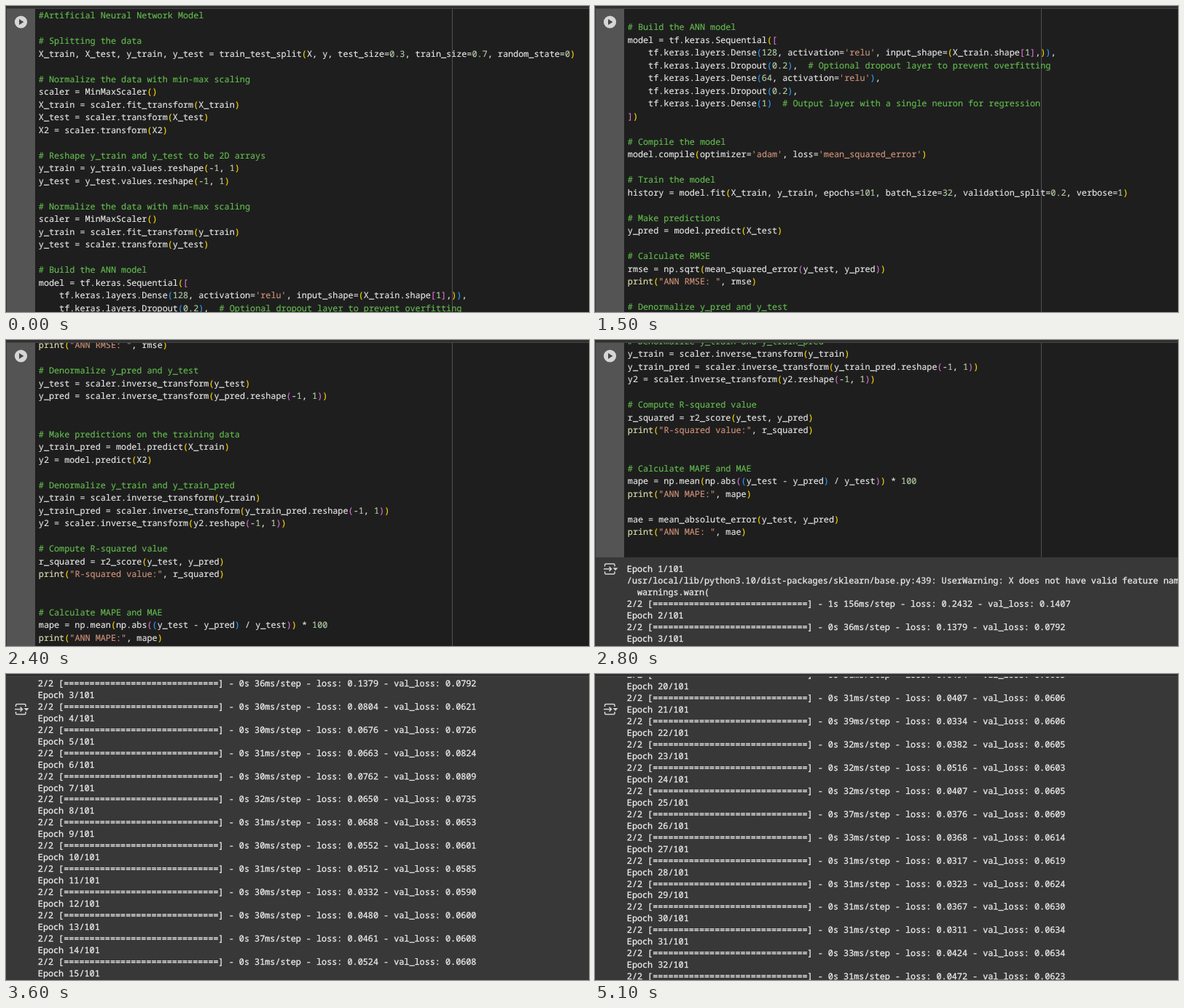
An HTML page that plays this animation: 800x421 px, repeating every 5.2 s.

```html
<!DOCTYPE html>
<html lang="en">
<head>
<meta charset="utf-8">
<title>Notebook scroll</title>
<style>
  html, body { margin: 0; width: 100%; height: 100%; overflow: hidden; background: #383838; }
  #stage { position: relative; width: 800px; height: 421px; overflow: hidden; background: #383838; }
  #doc { position: absolute; left: 0; top: 0; width: 800px; }
  pre {
    position: absolute; margin: 0; white-space: pre;
    font: 11.8px "Noto Sans Mono", "DejaVu Sans Mono", monospace;
    text-rendering: geometricPrecision; font-variant-ligatures: none;
  }
  #cell { position: absolute; left: 1px; top: 3px; width: 799px; height: 1200px; background: #1e1e1e; }
  #gutter { position: absolute; left: 0; top: 0; width: 39px; height: 100%; background: #545454; }
  #ruler { position: absolute; left: 611px; top: 0; width: 1px; height: 100%; background: #515151; }
  #code { left: 44.8px; top: 5.4px; line-height: 17.5px; color: #e6e6e6; -webkit-text-stroke: 0.15px; }
  #out { left: 43.8px; top: 1212.2px; line-height: 15.96px; color: #ececec; -webkit-text-stroke: 0.3px; }
  #bar { position: absolute; left: 0; top: 0; width: 800px; height: 3px; background: #303030; border-bottom: 1px solid #444; }
  svg { position: absolute; left: 0; top: 0; overflow: visible; }
  .comment { color: #62bb4d; }
  .str { color: #ce9178; }
  .num { color: #b5cea8; }
  .fn { color: #dcdcaa; }
  .b0 { color: #ffd700; }
  .b1 { color: #da70d6; }
  .b2 { color: #2a9fff; }
</style>
</head>
<body>
<div id="stage">
  <div id="doc">
    <div id="cell"><div id="gutter"></div><div id="ruler"></div></div>
    <pre id="code">#Artificial Neural Network Model

# Splitting the data
X_train, X_test, y_train, y_test = train_test_split(X, y, test_size=0.3, train_size=0.7, random_state=0)

# Normalize the data with min-max scaling
scaler = MinMaxScaler()
X_train = scaler.fit_transform(X_train)
X_test = scaler.transform(X_test)
X2 = scaler.transform(X2)

# Reshape y_train and y_test to be 2D arrays
y_train = y_train.values.reshape(-1, 1)
y_test = y_test.values.reshape(-1, 1)

# Normalize the data with min-max scaling
scaler = MinMaxScaler()
y_train = scaler.fit_transform(y_train)
y_test = scaler.transform(y_test)

# Build the ANN model
model = tf.keras.Sequential([
    tf.keras.layers.Dense(128, activation='relu', input_shape=(X_train.shape[1],)),
    tf.keras.layers.Dropout(0.2),  # Optional dropout layer to prevent overfitting
    tf.keras.layers.Dense(64, activation='relu'),
    tf.keras.layers.Dropout(0.2),
    tf.keras.layers.Dense(1)  # Output layer with a single neuron for regression
])

# Compile the model
model.compile(optimizer='adam', loss='mean_squared_error')

# Train the model
history = model.fit(X_train, y_train, epochs=101, batch_size=32, validation_split=0.2, verbose=1)

# Make predictions
y_pred = model.predict(X_test)

# Calculate RMSE
rmse = np.sqrt(mean_squared_error(y_test, y_pred))
print("ANN RMSE: ", rmse)

# Denormalize y_pred and y_test
y_test = scaler.inverse_transform(y_test)
y_pred = scaler.inverse_transform(y_pred.reshape(-1, 1))


# Make predictions on the training data
y_train_pred = model.predict(X_train)
y2 = model.predict(X2)

# Denormalize y_train and y_train_pred
y_train = scaler.inverse_transform(y_train)
y_train_pred = scaler.inverse_transform(y_train_pred.reshape(-1, 1))
y2 = scaler.inverse_transform(y2.reshape(-1, 1))

# Compute R-squared value
r_squared = r2_score(y_test, y_pred)
print("R-squared value:", r_squared)


# Calculate MAPE and MAE
mape = np.mean(np.abs((y_test - y_pred) / y_test)) * 100
print("ANN MAPE:", mape)

mae = mean_absolute_error(y_test, y_pred)
print("ANN MAE: ", mae)</pre>
    <pre id="out"></pre>
  </div>
  <svg id="play" width="1" height="1">
    <circle cx="20.5" cy="0" r="8.6" fill="#d6d6d6"/>
    <path d="M18 -4 L24.4 0 L18 4 Z" fill="#484848"/>
  </svg>
  <svg id="toggle" width="1" height="1" fill="none" stroke="#d6d6d6" stroke-width="1.5">
    <path d="M13.5 -3.5 V-5.5 Q13.5 -7 15 -7 H25.5 Q27 -7 27 -5.5 V-3.5 M13.5 3.5 V5.5 Q13.5 7 15 7 H25.5 Q27 7 27 5.5 V3.5"/>
    <path d="M12 0 H22.5 M19.5 -3 L22.5 0 L19.5 3"/>
    <path d="M24.5 -1.5 H31.5 L28 2.2 Z" fill="#d6d6d6" stroke="none"/>
  </svg>
  <div id="bar"></div>
</div>
<script>
  const $ = id => document.getElementById(id);

  // Syntax colours; brackets cycle through three colours by depth.
  function highlight(src) {
    let depth = 0;
    const span = (cls, s) => `<span class="${cls}">${s}</span>`;
    return src.replace(/#.*|'[^'\n]*'|"[^"\n]*"|[A-Za-z_]\w*|\d+(?:\.\d+)?|[()[\]]/g, s => {
      const c = s[0];
      if (c === '#') return span('comment', s);
      if (c === "'" || c === '"') return span('str', s);
      if (c === '(' || c === '[') return span('b' + depth++ % 3, s);
      if (c === ')' || c === ']') return span('b' + --depth % 3, s);
      if (/\d/.test(c)) return span('num', s);
      return s === 'print' ? span('fn', s) : s;
    });
  }

  // Training log: step time in ms, then losses in ten-thousandths.
  const ms = [156, 36, 30, 30, 31, 30, 32, 31, 30, 31, 30, 30, 37, 31, 31, 32,
    33, 31, 31, 31, 39, 32, 32, 32, 37, 33, 31, 31, 31, 31, 33, 31];
  const loss = [2432, 1379, 804, 676, 663, 762, 650, 688, 552, 512, 332, 480, 461, 524, 398, 506,
    544, 400, 494, 407, 334, 382, 516, 407, 376, 368, 317, 323, 367, 311, 424, 472];
  const val = [1407, 792, 621, 726, 824, 809, 735, 653, 601, 585, 590, 600, 608, 608, 602, 593,
    591, 596, 603, 606, 606, 605, 603, 605, 609, 614, 619, 624, 630, 634, 634, 623];
  const dec = n => (n / 1e4).toFixed(4);

  function trainingLog() {
    const lines = [];
    ms.forEach((m, i) => {
      lines.push(`Epoch ${i + 1}/101`);
      if (!i) lines.push(
        '/usr/local/lib/python3.10/dist-packages/sklearn/base.py:439: UserWarning: X does not have valid feature names, but MinMaxScaler was fitted with feature names',
        '  warnings.warn(');
      lines.push(`2/2 [${'='.repeat(30)}] - ${i ? 0 : 1}s ${m}ms/step - loss: ${dec(loss[i])} - val_loss: ${dec(val[i])}`);
    });
    return lines.join('\n');
  }

  $('code').innerHTML = highlight($('code').textContent);
  $('out').textContent = trainingLog();

  // Scroll path: monotone cubic through a few time and offset pairs.
  const LOOP = 5200, STEP = 100;
  const T = [0, 1000, 2000, 2800, 3600, 4300, 5100];
  const Y = [0, 184, 524, 904, 1286, 1648, 1840];
  const slope = T.slice(1).map((t, i) => (Y[i + 1] - Y[i]) / (t - T[i]));
  const tangent = T.map((_, i) => {
    const a = slope[i - 1], b = slope[i];
    if (a === undefined) return b * 0.7;
    if (b === undefined) return a * 0.6;
    return 2 * a * b / (a + b);
  });

  function scrollAt(t) {
    if (t >= T[T.length - 1]) return Y[Y.length - 1];
    const i = T.findIndex((_, k) => t < T[k + 1]);
    const h = T[i + 1] - T[i], u = (t - T[i]) / h, v = 1 - u;
    return v * v * ((1 + 2 * u) * Y[i] + u * h * tangent[i])
         + u * u * ((3 - 2 * u) * Y[i + 1] - v * h * tangent[i + 1]);
  }

  const CELL_END = 1203, OUT_ICON = 1219;
  const moveY = (id, y) => { $(id).style.transform = `translateY(${y}px)`; };

  function draw(now) {
    const t = Math.floor(now % LOOP / STEP) * STEP;
    const y = Math.round(scrollAt(t));
    moveY('doc', -y);
    moveY('play', Math.min(22, CELL_END - y - 20));
    moveY('toggle', Math.max(48.5, OUT_ICON - y));
  }

  function tick() {
    draw(performance.now());
    requestAnimationFrame(tick);
  }
  draw(0);
  requestAnimationFrame(tick);
</script>
</body>
</html>
```
